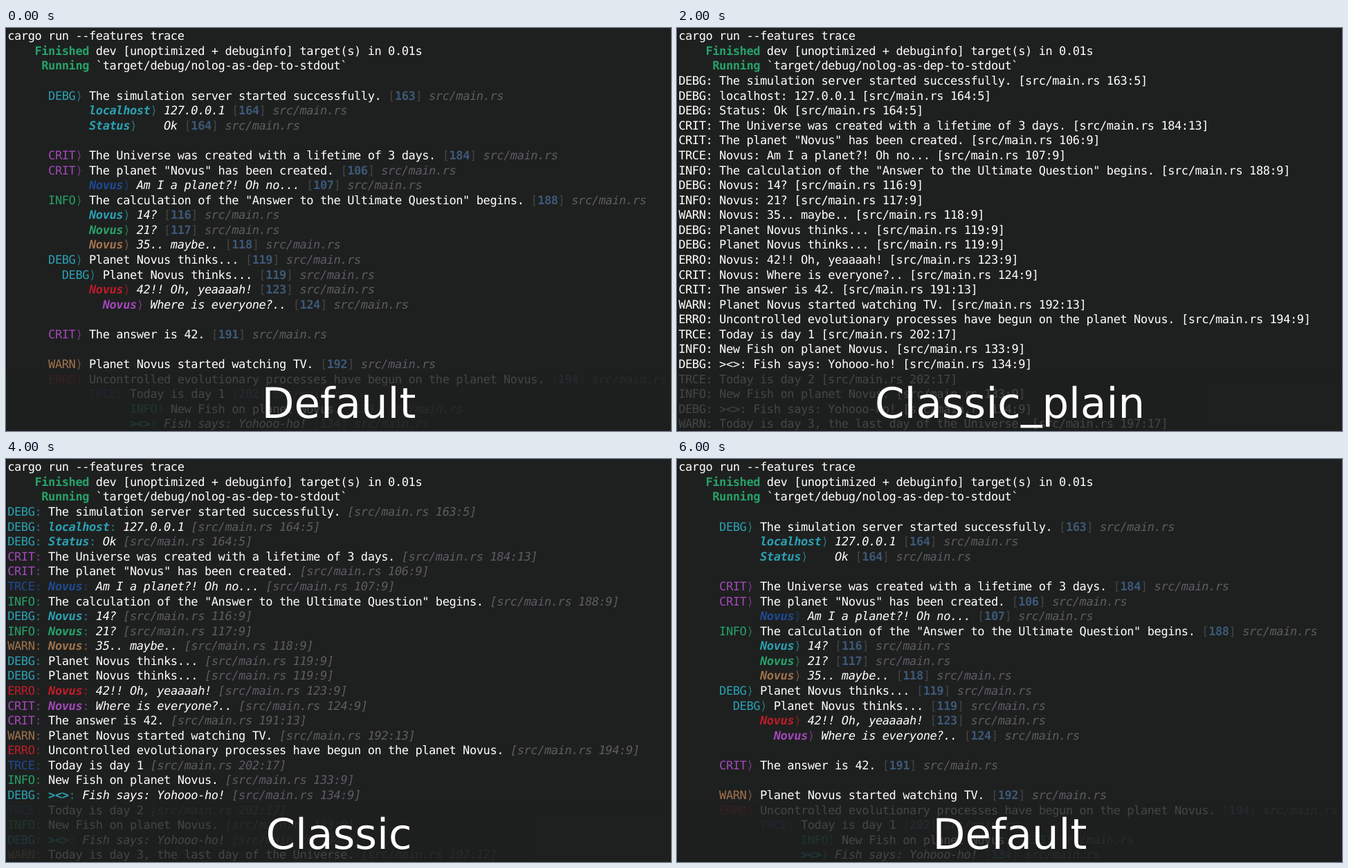
Recreate the animation shown at these times as an HTML page. Size 961 by 583 pixels, loop 8 s.

```html
<!DOCTYPE html>
<html lang="en">
<head>
<meta charset="utf-8">
<title>Log styles</title>
<style>
  html, body { margin: 0; width: 100%; height: 100%; overflow: hidden; background: #1e201f; }
  svg { display: block; width: 961px; height: 583px; }
  /* 17px glyphs sit on a slightly tighter terminal grid */
  text { font: 17px "DejaVu Sans Mono", monospace; letter-spacing: -.415px; fill: #fff; text-rendering: geometricPrecision; }
  .bold { font-weight: bold; }
  .italic { font-style: italic; }
  .dim { opacity: .7; }
  .caption { font: 61px "DejaVu Sans", sans-serif; letter-spacing: 0; text-anchor: middle; }
</style>
</head>
<body>
<svg id="stage" viewBox="0 0 961 583"></svg>
<script>
const NS = "http://www.w3.org/2000/svg";
const stage = document.getElementById("stage");
const CELL = 9.82, LEFT = 2.2, LINE = 21.58, BASE = 17.3;
const BG = "#1e201f", WHITE = "#fff", GREY = "#5e5c64", BRACKET = "#444448", NUMBER = "#3d5878", GREEN = "#26a269";
const LEVEL = {
  DEBG: "#2aa1b3", CRIT: "#a347ba", INFO: GREEN,
  WARN: "#a2734c", ERRO: "#c01c28", TRCE: "#1e4a94"
};

// level, key, message, place, then row and column in the default style
const LOG = [
  ["DEBG", "", "The simulation server started successfully.", "163:5", 4, 6],
  ["DEBG", "localhost", "127.0.0.1", "164:5", 5, 12],
  ["DEBG", "Status", "Ok", "164:5", 6, 12],
  ["CRIT", "", "The Universe was created with a lifetime of 3 days.", "184:13", 8, 6],
  ["CRIT", "", 'The planet "Novus" has been created.', "106:9", 9, 6],
  ["TRCE", "Novus", "Am I a planet?! Oh no...", "107:9", 10, 12],
  ["INFO", "", 'The calculation of the "Answer to the Ultimate Question" begins.', "188:9", 11, 6],
  ["DEBG", "Novus", "14?", "116:9", 12, 12],
  ["INFO", "Novus", "21?", "117:9", 13, 12],
  ["WARN", "Novus", "35.. maybe..", "118:9", 14, 12],
  ["DEBG", "", "Planet Novus thinks...", "119:9", 15, 6],
  ["DEBG", "", "Planet Novus thinks...", "119:9", 16, 8],
  ["ERRO", "Novus", "42!! Oh, yeaaaah!", "123:9", 17, 12],
  ["CRIT", "Novus", "Where is everyone?..", "124:9", 18, 14],
  ["CRIT", "", "The answer is 42.", "191:13", 20, 6],
  ["WARN", "", "Planet Novus started watching TV.", "192:13", 22, 6],
  ["ERRO", "", "Uncontrolled evolutionary processes have begun on the planet Novus.", "194:9", 23, 6],
  ["TRCE", "", "Today is day 1", "202:17", 24, 12],
  ["INFO", "", "New Fish on planet Novus.", "133:9", 25, 18],
  ["DEBG", "><>", "Fish says: Yohooo-ho!", "134:9", 26, 18],
  ["TRCE", "", "Today is day 2", "202:17"],
  ["INFO", "", "New Fish on planet Novus.", "133:9"],
  ["DEBG", "><>", "Fish says: Yohooo-ho!", "134:9"],
  ["WARN", "", "Today is day 3, the last day of the Universe.", "197:17"]
];

function add(parent, name, attrs, content) {
  const node = document.createElementNS(NS, name);
  for (const key in attrs) node.setAttribute(key, attrs[key]);
  if (content) node.textContent = content;
  parent.appendChild(node);
  return node;
}

// Writes one run on the character grid and returns the next free column.
function put(parent, row, col, str, color = WHITE, cls = "") {
  add(parent, "text", {
    x: (LEFT + col * CELL).toFixed(2),
    y: (BASE + row * LINE).toFixed(2),
    class: cls,
    style: "fill:" + color
  }, str);
  return col + str.length;
}

function drawDefault(g) {
  for (const [level, key, message, place, row, start] of LOG) {
    if (!row) continue;
    const color = LEVEL[level];
    let col = put(g, row, start, key || level, color, key ? "bold italic" : "");
    col = put(g, row, col, "\u27e9", color, "dim") + 1;
    if (key === "Status") col += 3; // values of a group line up
    col = put(g, row, col, message, WHITE, key ? "italic" : "") + 1;
    col = put(g, row, col, "[", BRACKET);
    col = put(g, row, col, place.split(":")[0], NUMBER, "bold");
    col = put(g, row, col, "]", BRACKET) + 1;
    put(g, row, col, "src/main.rs", GREY, "italic");
  }
}

function drawClassic(g, colored) {
  LOG.forEach(([level, key, message, place], i) => {
    const row = i + 3;
    const color = colored ? LEVEL[level] : WHITE;
    const style = cls => colored ? cls : "";
    let col = put(g, row, 0, level, color);
    col = put(g, row, col, ":", color, style("dim")) + 1;
    if (key) {
      col = put(g, row, col, key, color, style("bold italic"));
      col = put(g, row, col, ":", color, style("dim")) + 1;
    }
    col = put(g, row, col, message, WHITE, key ? style("italic") : "") + 1;
    put(g, row, col, `[src/main.rs ${place}]`, colored ? GREY : WHITE, style("italic"));
  });
}

function scene(title, draw) {
  const g = add(stage, "g", {});
  draw(g);
  add(g, "rect", { x: 0, y: 497, width: 961, height: 86, fill: BG, "fill-opacity": .83 });
  add(g, "text", { x: 481, y: 564, class: "caption" }, title);
  return g;
}

add(stage, "rect", { width: 961, height: 583, fill: BG });
add(stage, "rect", { width: 1, height: 497, fill: "#120f24" });
put(stage, 0, 0, "cargo run --features trace");
put(stage, 1, 4, "Finished", GREEN, "bold");
put(stage, 1, 13, "dev [unoptimized + debuginfo] target(s) in 0.01s");
put(stage, 2, 5, "Running", GREEN, "bold");
put(stage, 2, 13, "`target/debug/nolog-as-dep-to-stdout`");

const scenes = [
  scene("Default", drawDefault),
  scene("Classic_plain", g => drawClassic(g, false)),
  scene("Classic", g => drawClassic(g, true))
];
const ORDER = [0, 1, 2, 0];
const HOLD = 2000;

function render(ms) {
  const current = ORDER[Math.floor(ms / HOLD) % ORDER.length];
  scenes.forEach((g, i) => g.setAttribute("visibility", i === current ? "visible" : "hidden"));
}

const began = performance.now();
function tick() {
  render(performance.now() - began);
  requestAnimationFrame(tick);
}
tick();
</script>
</body>
</html>
```
